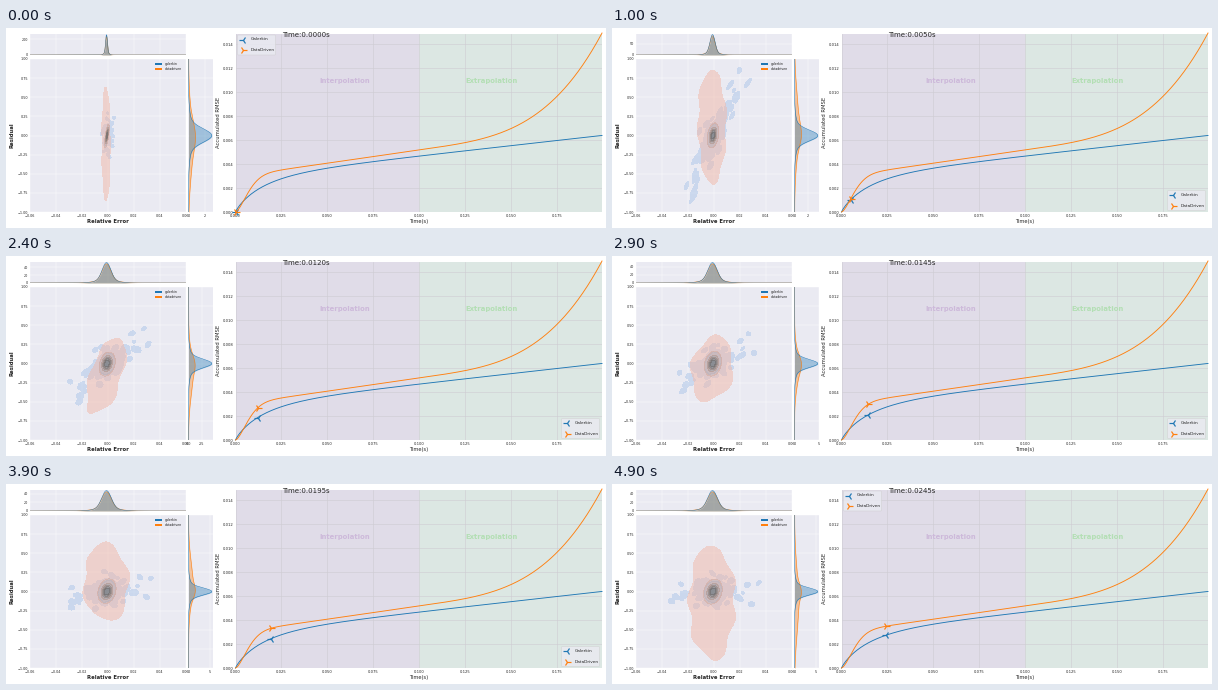
A matplotlib script that plays this animation: 600 by 200 pixels, repeating every 5000 ms.

```python
import numpy as np
import matplotlib.pyplot as plt
from matplotlib.animation import FuncAnimation
from matplotlib.colors import LinearSegmentedColormap
from matplotlib.patches import FancyBboxPatch, Rectangle

W, H, FRAMES, STEP = 600, 200, 50, 0.0005
PT = 0.72  # points per pixel at 100 dpi
BLUE, ORANGE, PANEL, INK = "#1f77b4", "#ff7f0e", "#eaeaf2", "#262626"
CX, CY, SX, SY = 102, 107.5, 1300, 76.5  # joint origin and pixels per unit
X0, Y0, PX_PER_S = 229.5, 184, 1835  # chart origin and time scale

plt.rcParams["font.family"] = "DejaVu Sans"
fig = plt.figure(figsize=(W / 100, H / 100), dpi=100, facecolor="white")


def panel(left, top, right, bottom):
    ax = fig.add_axes([left / W, 1 - bottom / H, (right - left) / W, (bottom - top) / H])
    ax.set_facecolor(PANEL)
    ax.set_axisbelow(True)
    ax.grid(color="white", lw=0.4 * PT)
    ax.tick_params(length=0, pad=1.6 * PT, labelsize=3.4 * PT, labelcolor=INK)
    for spine in ax.spines.values():
        spine.set_visible(False)
    return ax


joint = panel(23.5, 31, 180, 184)
top = panel(23.5, 5.5, 180, 27)
side = panel(182.5, 31, 207, 184)
chart = panel(X0, 5.5, 596, Y0)
stage = fig.add_axes([0, 0, 1, 1], zorder=5)
stage.set(xlim=(0, W), ylim=(H, 0))
stage.axis("off")


def label(x, y, text, size, **style):
    style = {"ha": "center", "va": "center", "color": INK, **style}
    return stage.text(x, y, text, fontsize=size * PT, **style)


# Fixed parts
x_limits = ((23.5 - CX) / SX, (180 - CX) / SX)
x_ticks, y_ticks = np.arange(-3, 4) * 0.02, np.arange(-4, 5) / 4
joint.set(xlim=x_limits, ylim=(-1, 1), xticks=x_ticks, yticks=y_ticks)
joint.xaxis.set_major_formatter("{x:.2f}")
joint.yaxis.set_major_formatter("{x:.2f}")
top.set(xlim=x_limits, xticks=x_ticks)
top.tick_params(labelbottom=False)
side.set(ylim=(-1, 1), yticks=y_ticks)
side.tick_params(labelleft=False)

chart.set(xlim=(0, 0.1997), ylim=(0, 0.01488),
          xticks=np.arange(8) * 0.025, yticks=np.arange(8) * 0.002)
chart.xaxis.set_major_formatter("{x:.3f}")
chart.yaxis.set_major_formatter("{x:.3f}")
chart.tick_params(labelsize=3.8 * PT)
chart.grid(color="#cfcdd4", lw=0.6 * PT)
chart.axvspan(0, 0.1, color="#e0dce8", lw=0, zorder=0)
chart.axvspan(0.1, 0.2, color="#dce7e3", lw=0, zorder=0)

label(101.5, 193.5, "Relative Error", 5.3, weight="bold")
label(6, 107.5, "Residual", 5.3, weight="bold", rotation=90)
label(412.5, 193.5, "Time(s)", 5.1)
label(213, 94.5, "Accumulated RMSE", 5.2, rotation=90)
label(339, 53, "Interpolation", 6.9, weight="bold", color="#cdb9da")
label(486, 53, "Extrapolation", 6.9, weight="bold", color="#b3dfb4")
clock = label(276, 7.2, "", 7.0, ha="left")

for y, name, color in ((36, "galerkin", BLUE), (41, "datadriven", ORANGE)):
    stage.add_patch(Rectangle((148.5, y - 1.2), 7.5, 2.4, color=color, lw=0))
    label(159, y, name, 3.3, ha="left")


# Error curves in stage pixels: a fast start, a steady drift, a late blow-up
def galerkin(x):
    u = x - X0
    return Y0 - 0.112 * u - 35.5 * (1 - np.exp(-(u / 27.5) ** 0.88))


def datadriven(x):
    u = x - X0
    late = np.clip((x - 413) / 183, 0, None)
    return Y0 - 0.144 * u - 35.6 * (1 - np.exp(-(u / 16.1) ** 1.6)) - 90.6 * late ** 3.5


CURVES = (galerkin, datadriven)
xs = np.linspace(X0, 596, 400)
tips, keys, names = [], [], []
for curve, color, marker, name in ((galerkin, BLUE, "3", "Galerkin"),
                                   (datadriven, ORANGE, "4", "DataDriven")):
    stage.plot(xs, curve(xs), color=color, lw=0.9 * PT)
    style = dict(ls="", marker=marker, ms=8 * PT, mew=1.2 * PT, color=color)
    tips.append(stage.plot([0], [0], **style)[0])
    keys.append(stage.plot([0], [0], zorder=6, **style)[0])
    names.append(label(0, 0, name, 4.2, ha="left", zorder=6))
frame_box = FancyBboxPatch((0, 0), 38, 20, boxstyle="round,pad=0,rounding_size=1",
                           fc=PANEL, ec="#cccccc", lw=0.5 * PT, alpha=0.8, zorder=5)
stage.add_patch(frame_box)

# Joint densities in pixels from the joint origin
rng = np.random.default_rng(4)
PATCHES = 60
along, across = rng.normal(size=(2, PATCHES))
weight = rng.uniform(0.035, 0.08, PATCHES)
gx, gy = np.meshgrid(np.linspace(-79, 79, 317), np.linspace(-77, 77, 309))
LEVELS = [.03, .1, .28, .46, .64, .82, 3]
blue_map = LinearSegmentedColormap.from_list("b", ["#abc5ea", "#7f9ab8", "#5f7488"])
orange_map = LinearSegmentedColormap.from_list("o", ["#f0b8a8", "#a88f84", "#706c6a"])


def bell(d, s):
    return np.exp(-0.5 * (d / s) ** 2)


def body(x, y, half_w, half_h, tilt):
    """Flat-topped tilted blob whose outer contour has the given half sizes."""
    u, v = x / half_w, y / half_h
    return 0.08 * np.exp(-((u * u - 2 * tilt * u * v + v * v) / (1 - tilt ** 2)) ** 2)


def joint_fields(n, half_w, mid_y, half_h):
    x = gx + 0.1 * half_w * np.sin(gy / 6 + n * 0.7)
    y = gy + 2 * np.sin(gx / 5 - n * 0.5)
    core = bell(gx + 1 - 0.15 * gy, 0.15 * half_w) * bell(gy, 4.5)
    tilt = 0.6 * bell(n - 24, 3) - 0.25 * bell(n - 17, 2)
    cloud = core + body(x + 2, y - mid_y, half_w, half_h, tilt)

    # The scatter axis swings from steep to level
    angle = np.radians(84 * max(0, 1 - n / 44))
    c, s = np.cos(angle), np.sin(angle)
    p, q = x * c + y * s, y * c - x * s
    length = (19 + 16 * bell(n - 14, 5.5)) * (1 - 0.5 * np.exp(-n / 3))
    width = 1.5 + 0.28 * half_w
    spots = body(p, q, 0.85 * length, 1.4 * width, 0)
    for u, v, w in zip(along, across, weight):
        patch = w * bell(p - length * u, 0.13 * length) * bell(q - width * v, 1 + 0.05 * half_w)
        spots = np.maximum(spots, patch)
    return core + spots, cloud


def tick_step(limit, steps):
    return next((s for s in steps if limit / s < 3), steps[-1])


moving = []


def marginal(ax, pos, density, color, upright):
    fill, line = (ax.fill_between, (pos, density)) if upright else (ax.fill_betweenx, (density, pos))
    moving.append(fill(pos, 0, density, color=color, alpha=0.37, lw=0))
    moving.extend(ax.plot(*line, color=color, lw=0.5 * PT))


def draw_marginals(n, mid_y, half_h):
    d = np.linspace(-79, 79, 400)
    top_limit = 50 + 220 * np.exp(-n / 6.5)
    side_limit = min(3 + 0.07 * n, 5.7)
    top_s, side_s = 235 / top_limit, 19.5 / side_limit  # unit area: taller means narrower
    for color, tail, height in ((ORANGE, 2.5, 0.89), (BLUE, 2.2, 0.95)):
        shape = 0.84 * bell(d + 1.5, top_s) + 0.16 * bell(d + 1.5, tail * top_s)
        marginal(top, d / SX, height * top_limit * shape, color, True)
    orange_side = 0.17 * bell(d - mid_y, 0.55 * half_h) + 0.12 * bell(d, 2 * side_s)
    blue_side = 0.8 * bell(d, side_s) + 0.15 * bell(d, 2.6 * side_s)
    marginal(side, d / SY, side_limit * orange_side, ORANGE, False)
    marginal(side, d / SY, side_limit * blue_side, BLUE, False)

    top.set_ylim(0, top_limit)
    top.set_yticks(np.arange(0, top_limit, tick_step(top_limit, (20, 25, 50, 200))))
    side.set_xlim(0, side_limit)
    step = 2 if side_limit < 4 else 2.5 if side_limit < 5 else 5
    ticks = np.arange(0, side_limit, step)
    side.set_xticks(ticks, [f"{t:.1f}" if step == 2.5 else f"{t:.0f}" for t in ticks])


def draw(n):
    while moving:
        moving.pop().remove()

    half_w = 4 + 19 * (1 - np.exp(-n / 14))
    half_h = 57 - 25 * np.exp(-((n - 31.5) / 10) ** 4)
    mid_y = 11 * np.cos(2 * np.pi * (n - 10.5) / 27) - 1
    spots, cloud = joint_fields(n, half_w, mid_y, half_h)
    for field, cmap in ((spots, blue_map), (cloud, orange_map)):
        colors = cmap(np.linspace(0, 1, len(LEVELS) - 1))
        moving.append(joint.contourf(gx / SX, gy / SY, field, LEVELS, colors=colors, alpha=0.5))
    draw_marginals(n, mid_y, half_h)

    # Time markers and the legend that jumps between corners
    clock.set_text(f"Time:{n * STEP:.4f}s")
    now = X0 + n * STEP * PX_PER_S
    left, upper = (555.5, 162.5) if 3 <= n <= 45 else (231.5, 7)
    frame_box.set_x(left)
    frame_box.set_y(upper)
    for i, curve in enumerate(CURVES):
        row = upper + 4.5 + 10.6 * i
        tips[i].set_data([now], [curve(now)])
        keys[i].set_data([left + 5.5], [row])
        names[i].set_position((left + 13.3, row))
    return []


anim = FuncAnimation(fig, draw, frames=FRAMES, interval=100, init_func=lambda: [],
                     repeat=True, repeat_delay=0, blit=False)
plt.show()
```
